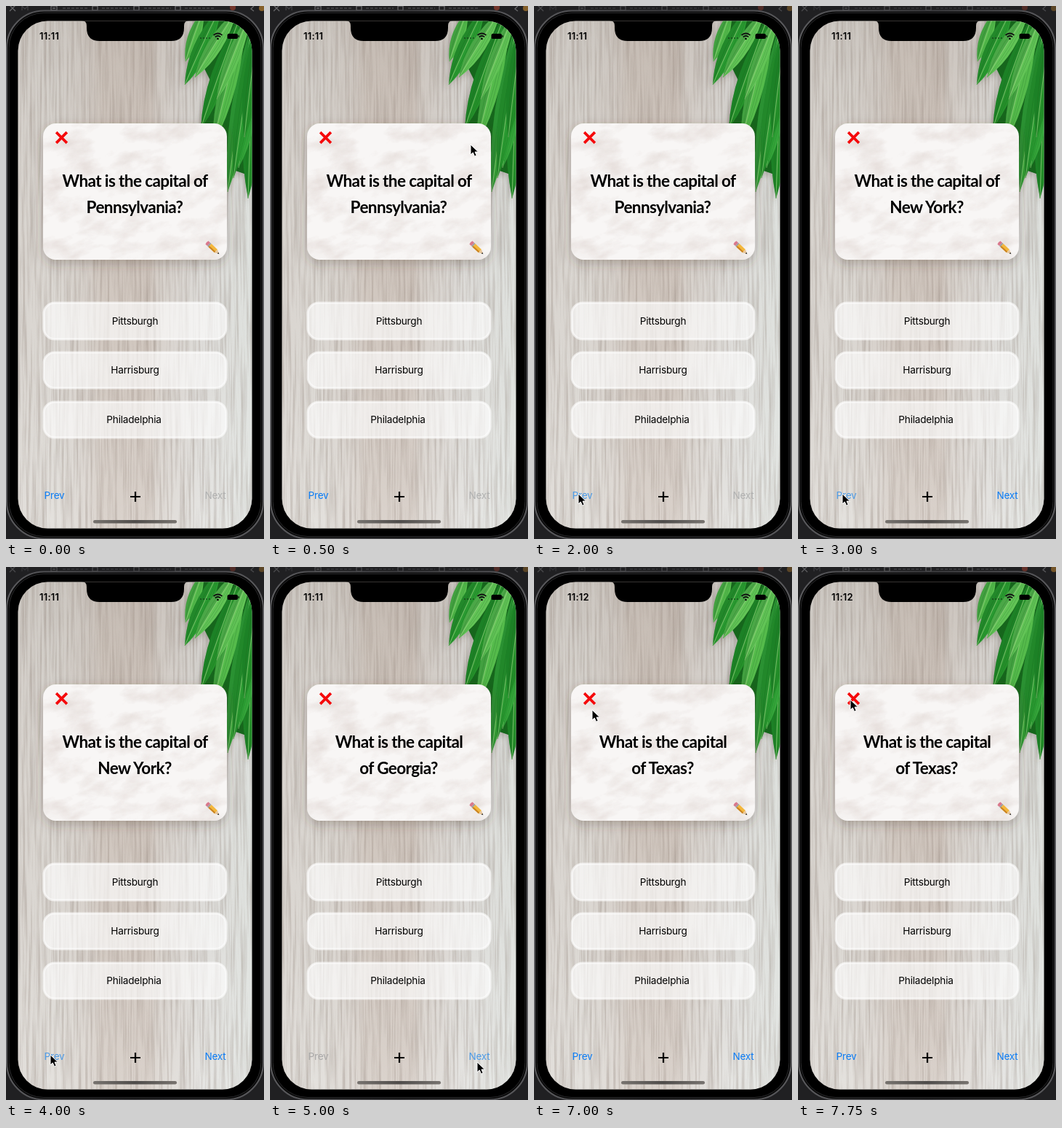
Recreate the animation shown at these times as an HTML page. Size 355 by 731 pixels, loop 8000 ms.

```html
<!DOCTYPE html>
<html lang="en">
<head>
<meta charset="utf-8">
<title>Capitals quiz</title>
<style>
html, body { margin: 0; width: 100%; height: 100%; overflow: hidden; background: #202022; }
svg { display: block; width: 355px; height: 731px; }
text { font-family: Inter, Roboto, sans-serif; font-size: 13.6px; letter-spacing: -.2px; text-anchor: middle; }
.clock text { font-size: 13px; font-weight: 600; text-anchor: start; letter-spacing: .2px; }
.q text { font-family: Lato, "Open Sans", sans-serif; font-size: 22.5px; font-weight: 700; letter-spacing: -.6px; }
.choice rect { fill: #fff; fill-opacity: .66; stroke: #fff; stroke-opacity: .62; stroke-width: 3; }

#cursor, .q, .clock text, #prev, #next, #bar { animation: 8s step-end infinite; }
#cursor { animation-name: cursor; }
#penn { animation-name: penn; }
#york { animation-name: york; }
#texas { animation-name: texas; }
#georgia { animation-name: georgia; }
#early { animation-name: early; }
#late { animation-name: late; }
#prev { animation-name: prev; }
#next { animation-name: next; }
#bar { animation-name: bar; }

@keyframes cursor {
  0% { transform: translate(400px, 20px); }
  3.125% { transform: translate(342px, 34px); }
  6.25% { transform: translate(276px, 190px); }
  9.375% { transform: translate(208px, 372px); }
  12.5% { transform: translate(174px, 465px); }
  15.625% { transform: translate(167px, 481px); }
  18.75% { transform: translate(148px, 523px); }
  21.875% { transform: translate(85px, 636px); }
  25% { transform: translate(61px, 669px); }
  59.375% { transform: translate(190px, 677px); }
  62.5% { transform: translate(285px, 679px); }
  78.125% { transform: translate(276px, 650px); }
  81.25% { transform: translate(215px, 478px); }
  84.375% { transform: translate(122px, 275px); }
  87.5% { transform: translate(80px, 196px); }
  90.625%, 100% { transform: translate(72px, 182px); }
}
@keyframes penn { 0% { opacity: 1; } 37.5%, 100% { opacity: 0; } }
@keyframes york { 0% { opacity: 0; } 37.5% { opacity: 1; } 53.125%, 100% { opacity: 0; } }
@keyframes texas { 0% { opacity: 0; } 53.125% { opacity: 1; } 56.25% { opacity: 0; } 65.625%, 100% { opacity: 1; } }
@keyframes georgia { 0% { opacity: 0; } 56.25% { opacity: 1; } 65.625%, 100% { opacity: 0; } }
@keyframes early { 0% { opacity: 1; } 84.375%, 100% { opacity: 0; } }
@keyframes late { 0% { opacity: 0; } 84.375%, 100% { opacity: 1; } }
@keyframes prev {
  0% { fill: #0a7cf5; }
  25% { fill: #4d9be6; }
  40.625% { fill: #0a7cf5; }
  50% { fill: #4d9be6; }
  53.125% { fill: #0a7cf5; }
  56.25% { fill: #a9a8a8; }
  65.625%, 100% { fill: #0a7cf5; }
}
@keyframes next {
  0% { fill: #b0b1b1; }
  37.5% { fill: #0a7cf5; }
  62.5% { fill: #4d9be6; }
  68.75%, 100% { fill: #0a7cf5; }
}
@keyframes bar { 0% { opacity: .6; } 25% { opacity: .35; } 96.875%, 100% { opacity: .5; } }
</style>
</head>
<body>
<svg viewBox="0 0 355 731">
  <defs>
    <clipPath id="screen"><rect x="16.500" y="20.500" width="322" height="696" rx="41"/></clipPath>
    <clipPath id="face"><rect x="51" y="161" width="253" height="187" rx="18"/></clipPath>
    <linearGradient id="wood">
      <stop offset="0" stop-color="#dbd7d2"/>
      <stop offset=".16" stop-color="#dddad5"/>
      <stop offset=".3" stop-color="#d8d2cc"/>
      <stop offset=".36" stop-color="#d2c9c1"/>
      <stop offset=".56" stop-color="#d0c6be"/>
      <stop offset=".6" stop-color="#d9d3cd"/>
      <stop offset=".78" stop-color="#dfdedb"/>
      <stop offset="1" stop-color="#e1e5e2"/>
    </linearGradient>
    <linearGradient id="light" x2="0" y2="1">
      <stop offset="0" stop-color="#8f857c" stop-opacity=".2"/>
      <stop offset=".4" stop-color="#b5aaa2" stop-opacity=".06"/>
      <stop offset="1" stop-color="#fff" stop-opacity=".2"/>
    </linearGradient>
    <linearGradient id="rim">
      <stop offset="0" stop-color="#5b5b5e"/>
      <stop offset=".5" stop-color="#3b3b3e"/>
      <stop offset="1" stop-color="#5b5b5e"/>
    </linearGradient>
    <linearGradient id="home">
      <stop offset="0" stop-color="#77736f"/>
      <stop offset=".5" stop-color="#4f4c4a"/>
      <stop offset="1" stop-color="#77736f"/>
    </linearGradient>
    <filter id="grain" x="0" y="0" width="1" height="1" color-interpolation-filters="sRGB">
      <feTurbulence type="fractalNoise" baseFrequency=".3 .008" numOctaves="4" seed="7"/>
      <feColorMatrix values="0 0 0 0 .5  0 0 0 0 .44  0 0 0 0 .4  1.8 0 0 0 -.75"/>
    </filter>
    <filter id="marble" x="0" y="0" width="1" height="1" color-interpolation-filters="sRGB">
      <feTurbulence type="fractalNoise" baseFrequency=".022 .045" numOctaves="5" seed="4"/>
      <feColorMatrix values="0 0 0 0 .84  0 0 0 0 .79  0 0 0 0 .77  2.2 0 0 0 -.95"/>
    </filter>
    <filter id="shadow" x="-20%" y="-20%" width="140%" height="150%">
      <feDropShadow dx="0" dy="5" stdDeviation="8" flood-color="#463a33" flood-opacity=".3"/>
    </filter>
    <filter id="soft" x="-30%" y="-20%" width="160%" height="150%">
      <feDropShadow dx="-3" dy="4" stdDeviation="4" flood-color="#4b433d" flood-opacity=".28"/>
    </filter>
  </defs>

  <rect width="355" height="731" fill="#202022"/>
  <g id="bar" fill="none" stroke="#97979a" stroke-width="1.300">
    <path d="M5 -1l8 8m0-8l-8 8M62 0h8v6h-8zM64 3h4M119 0h7v6h-7zM176 0h7v6h-7zM233 0h7v6h-7zM341 0l-4 4 4 3"/>
    <path d="M22 6V0l4 4 4-4v6" stroke="#56565a"/>
    <path d="M78 3h36M132 3h38M190 3h37M246 3h42" stroke="#5c5c60" stroke-dasharray="4 2"/>
    <circle cx="312" cy="2" r="4" fill="#a94332" stroke="none"/>
    <circle cx="352" cy="3" r="4" fill="#c98b30" stroke="none"/>
  </g>

  <rect x="1" y="6.500" width="353" height="724" rx="51" fill="#090909" stroke="url(#rim)" stroke-width="2"/>
  <rect x="4" y="9.500" width="347" height="718" rx="48" fill="#000" stroke="#29292b"/>

  <g clip-path="url(#screen)">
    <rect x="16" y="20" width="323" height="697" fill="url(#wood)"/>
    <rect x="16" y="20" width="323" height="697" fill="url(#light)"/>
    <rect x="16" y="20" width="323" height="697" filter="url(#grain)" opacity=".42"/>
    <path d="M69 21v695M204 21v695M258 21v695" stroke="#8d8078" stroke-opacity=".22"/>
    <g id="leaves" filter="url(#soft)">
      <path d="M268 10L252 70 272 84 282 104 270 158 300 190 316 226 345 236V10z" fill="#17661d"/>
    </g>
    <path d="M104 20q7 0 7 7v3q0 18 18 18h98q18 0 18-18v-3q0-7 7-7z" fill="#000"/>
    <g class="clock">
      <text id="early" x="46" y="46">11:11</text>
      <text id="late" x="46" y="46">11:12</text>
    </g>
    <g fill="none" stroke="#111" stroke-width="1.800">
      <path d="M285.500 40q6-5 12 0M287.800 42.500q3.700-3 7.400 0"/>
      <path d="M267 44h14" stroke-width="1.500" stroke-dasharray="2 2" stroke-opacity=".55"/>
    </g>
    <circle cx="291.500" cy="45" r="1.300"/>
    <rect x="304.500" y="38" width="14.500" height="7" rx="2"/>
    <rect x="319.600" y="40" width="1.200" height="3" rx=".6"/>
  </g>

  <rect x="51" y="161" width="253" height="187" rx="18" fill="#f8f6f5" filter="url(#shadow)"/>
  <g clip-path="url(#face)">
    <rect x="0" y="100" width="360" height="310" filter="url(#marble)" opacity=".55" transform="rotate(-14 177 254)"/>
  </g>
  <path d="M70.500 174.500l12 12m0-12l-12 12" stroke="#f5090b" stroke-width="3.800" stroke-linecap="square"/>
  <g transform="translate(276.500 324.500) rotate(43)">
    <path d="M0-3h3.500v6H0q-1.500-3 0-6z" fill="#d9788c"/>
    <path d="M3.500-3H5.500v6H3.500z" fill="#9a9ca0"/>
    <path d="M5.500-3H17v6H5.500z" fill="#f3b73c"/>
    <path d="M5.500 1H17v2H5.500z" fill="#c98222"/>
    <path d="M17-3l6 3-6 3z" fill="#e8c79d"/>
    <path d="M20.600-1.200l2.400 1.200-2.400 1.200z" fill="#333"/>
  </g>

  <g class="q" id="penn"><text x="177.500" y="248">What is the capital of</text><text x="177" y="284">Pennsylvania?</text></g>
  <g class="q" id="york"><text x="177.500" y="248">What is the capital of</text><text x="177" y="284">New York?</text></g>
  <g class="q" id="texas"><text x="177.500" y="248">What is the capital</text><text x="177" y="284">of Texas?</text></g>
  <g class="q" id="georgia"><text x="177.500" y="248">What is the capital</text><text x="177" y="284">of Georgia?</text></g>

  <g class="choice">
    <rect x="52" y="407" width="251" height="50" rx="15"/><text x="177.500" y="437">Pittsburgh</text>
    <rect x="52" y="475" width="251" height="49" rx="15"/><text x="177.500" y="504">Harrisburg</text>
    <rect x="52" y="543" width="251" height="49" rx="15"/><text x="176" y="572">Philadelphia</text>
  </g>

  <text id="prev" x="66.500" y="676">Prev</text>
  <text id="next" x="288" y="676">Next</text>
  <path d="M171 673h14m-7-7v14" stroke="#000" stroke-width="2.200"/>
  <rect x="120" y="705" width="115" height="4.500" rx="2.200" fill="url(#home)"/>

  <path id="cursor" d="M0 0v14l3.300-3 2.200 5.200 2.700-1.100-2.200-5h4.500z" fill="#000" stroke="#fff" stroke-width="1" stroke-linejoin="round"/>
</svg>
<script>
// Each leaf: base x, base y, tip x, tip y, half width
const leaves = [
  [345, 30, 333, 264, 26], [345, 70, 320, 222, 24], [272, 5, 247, 76, 17],
  [296, 0, 246, 108, 22], [318, 5, 260, 98, 20], [322, 15, 268, 168, 22],
  [340, 20, 305, 255, 24], [330, 12, 284, 192, 22], [348, 10, 313, 236, 24],
  [338, 5, 290, 128, 18], [350, 10, 328, 180, 22]
];
const greens = ["#25912b", "#35a63a", "#55bb4c", "#2a9a30", "#62c457"];
const group = document.getElementById("leaves");

function addPath(d, style) {
  const path = document.createElementNS("http://www.w3.org/2000/svg", "path");
  path.setAttribute("d", d);
  for (const key in style) path.setAttribute(key, style[key]);
  group.append(path);
}

leaves.forEach(([x, y, tx, ty, w], i) => {
  const len = Math.hypot(tx - x, ty - y);
  const nx = (y - ty) / len, ny = (tx - x) / len;
  const side = k => `${x + (tx - x) * .55 + nx * k} ${y + (ty - y) * .55 + ny * k}`;
  const curve = k => `M${x} ${y}Q${side(k)} ${tx} ${ty}`;
  addPath(`${curve(w)}Q${side(-w)} ${x} ${y}`, { fill: greens[i % 5] });
  addPath(`${curve(w)}Q${side(w * .1)} ${x} ${y}`, { fill: "#0b4f18", "fill-opacity": .25 });
  for (const k of [-.6, -.3, .1, .5]) {
    addPath(curve(w * k), {
      fill: "none",
      stroke: k === .1 ? "#a6dc8a" : "#0f5a1a",
      "stroke-opacity": k === .1 ? .6 : .3,
      "stroke-width": k === .1 ? 1.1 : .7
    });
  }
});
</script>
</body>
</html>
```
